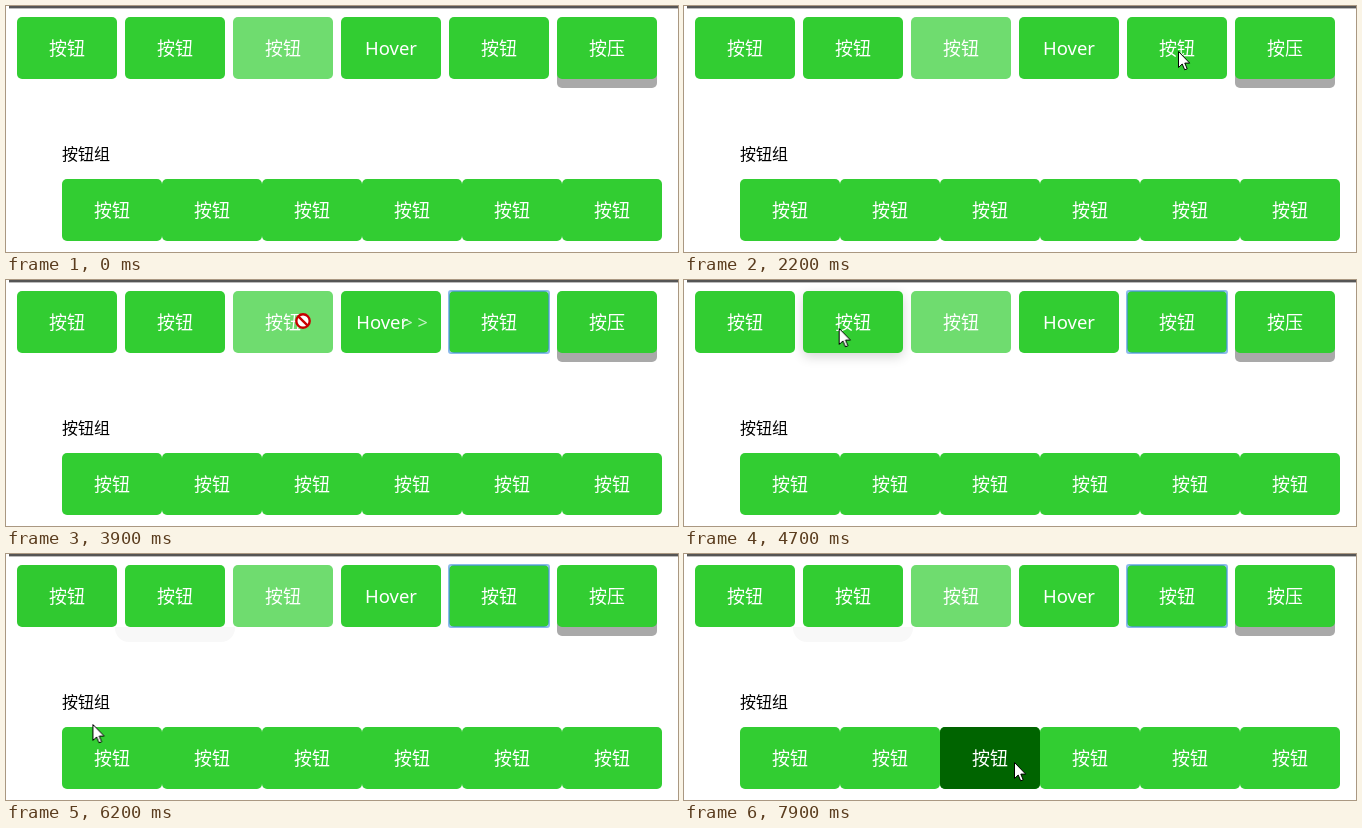
Animation of 672 by 246 pixels, one loop 8 s. Source, as an HTML page:

```html
<!DOCTYPE html>
<html lang="zh-CN">
<head>
<meta charset="utf-8">
<title>按钮</title>
<style>
/* --p: progress of an element's own effect, 0 to 1 */
@property --p { syntax: "<number>"; inherits: true; initial-value: 0; }

html, body { margin: 0; width: 100%; height: 100%; overflow: hidden; background: #fff; }
.stage {
  position: relative; width: 672px; height: 246px; overflow: hidden;
  font: 18px/62px "Open Sans", "Noto Sans CJK SC", "Noto Sans CJK", sans-serif;
}
.stage * { box-sizing: border-box; animation: 8s step-end -8ms infinite; }
.bar { position: absolute; left: 3px; right: 0; top: 0; height: 3px; background: #555; border-bottom: 1px solid #bbb; }
.label { position: absolute; left: 56px; top: 136px; font-size: 16px; line-height: 24px; color: #000; }
.halo { position: absolute; left: 109px; top: 73px; width: 120px; height: 15px; border-radius: 0 0 14px 14px; background: #f8f8f8; animation-name: halo; }

.row { position: absolute; display: flex; }
.top { left: 11px; top: 11px; gap: 8px; }
.group { left: 56px; top: 173px; }
.btn {
  position: relative; isolation: isolate; flex: none; width: 100px; height: 62px;
  border-radius: 5px; background: #32cd32; color: #fff; text-align: center; white-space: pre;
}
.dark::before {
  content: ""; position: absolute; inset: 0; z-index: -1;
  border-radius: inherit; background: #006400; opacity: var(--p);
}
.first { animation-name: first; }
.lift { box-shadow: 0 4px 12px rgba(0, 0, 0, calc(var(--p) * .2)); animation-name: lift; }
.off { opacity: .7; }
.more { font-family: "Noto Sans", "Open Sans", sans-serif; font-size: 18.5px; animation-name: more; }
.more span { display: block; transform: translateX(calc(var(--p) * -12.5px)); }
.more::after {
  content: "> >"; position: absolute; top: 0; right: calc(8px + var(--p) * 7.5px);
  font-size: 18px; opacity: var(--p);
}
.clip { position: absolute; inset: 0; overflow: hidden; border-radius: inherit; }
.wave {
  position: absolute; background: #f1f1f1; opacity: calc(1 - var(--p));
  left: calc(32px - var(--p) * 20px); top: calc(46px - var(--p) * 120px);
  width: calc(var(--p) * 350px); height: calc(var(--p) * 300px);
}
.stage .wave { animation-name: wave; }
.ring { position: absolute; inset: -1px; border: 2px solid rgba(77, 150, 224, .65); border-radius: 3px; }
.stage .ring5 { animation-name: ring5; }
.stage .ring6 { animation-name: ring6; }
.stage .press { box-shadow: 0 9px #a9a9a9; animation-name: shade, press; }
.stage .g1 { animation-name: g1; }
.stage .g2 { animation-name: g2; }
.stage .g3 { animation-name: g3; }
.stage .first { animation-name: first; }
.stage .lift { animation-name: lift; }
.stage .more { animation-name: more; }
.stage .halo { animation-name: halo; }

.cursor { position: absolute; left: 0; top: 0; width: 0; height: 0; }
.cursor svg { position: absolute; left: 0; top: 0; overflow: visible; }
.stage .cursor { animation-name: move; animation-timing-function: linear; }
.stage .arrow { animation-name: arrow; }
.stage .ban { animation-name: ban; }

/* 1.25% is 100 ms */
@keyframes shade {
  0% { --p: 0; } 3.75% { --p: .41; } 5% { --p: .8; } 6.25% { --p: .96; } 7.5% { --p: 1; }
  17.5% { --p: .59; } 18.75% { --p: .2; } 20% { --p: .04; } 21.25%, 100% { --p: 0; }
}
@keyframes press {
  0% { transform: none; box-shadow: 0 9px #a9a9a9; }
  12.5% { transform: translateY(2px); box-shadow: 0 7px #898989; }
  13.75% { transform: translateY(1px); box-shadow: 0 8px #999; }
  15%, 100% { transform: none; box-shadow: 0 9px #a9a9a9; }
}
@keyframes ring6 { 0% { opacity: 0; } 12.5% { opacity: 1; } 27.5%, 100% { opacity: 0; } }
@keyframes ring5 { 0% { opacity: 0; } 28.75%, 100% { opacity: 1; } }
@keyframes wave {
  0% { --p: 1; } 27.5% { --p: 0; } 28.75% { --p: .14; } 30% { --p: .41; } 31.25% { --p: .64; }
  32.5% { --p: .8; } 33.75% { --p: .9; } 35% { --p: .96; } 36.25% { --p: .99; } 37.5%, 100% { --p: 1; }
}
@keyframes more {
  0% { --p: 0; } 38.75% { --p: .295; } 40% { --p: .683; } 41.25% { --p: .885; } 42.5% { --p: .976; } 43.75% { --p: 1; }
  48.75% { --p: .705; } 50% { --p: .317; } 51.25% { --p: .115; } 52.5% { --p: .024; } 53.75%, 100% { --p: 0; }
}
@keyframes lift {
  0% { --p: 0; } 57.5% { --p: .41; } 58.75% { --p: .8; } 60% { --p: 1; }
  65% { --p: .59; } 66.25% { --p: .2; } 67.5%, 100% { --p: 0; }
}
@keyframes halo { 0% { opacity: 0; } 60%, 100% { opacity: 1; } }
@keyframes first {
  0% { --p: 0; } 66.25% { --p: .1; } 67.5% { --p: .4; } 68.75% { --p: .76; } 70% { --p: 1; }
  75% { --p: .59; } 76.25% { --p: .2; } 77.5% { --p: .04; } 78.75%, 100% { --p: 0; }
}
@keyframes g1 { 0% { --p: 0; } 78.75% { --p: 1; } 80% { --p: 0; } 83.75% { --p: 1; } 86.25%, 100% { --p: 0; } }
@keyframes g2 { 0% { --p: 0; } 86.25% { --p: 1; } 92.5%, 100% { --p: 0; } }
@keyframes g3 { 0% { --p: 0; } 92.5%, 100% { --p: 1; } }
@keyframes arrow { 0% { opacity: 1; } 48.75% { opacity: 0; } 55%, 100% { opacity: 1; } }
@keyframes ban { 0% { opacity: 0; } 48.75% { opacity: 1; } 55%, 100% { opacity: 0; } }
@keyframes move {
  0% { transform: translate(700px, 50px); animation-timing-function: step-end; }
  3.75% { transform: translate(663px, 50px); animation-timing-function: steps(4, start); }
  8.75% { transform: translate(608px, 50px); }
  17.5% { transform: translate(608px, 50px); animation-timing-function: steps(4, start); }
  22.5% { transform: translate(510px, 45px); }
  23.75% { transform: translate(510px, 45px); animation-timing-function: steps(2, start); }
  26.25% { transform: translate(494px, 45px); }
  33.75% { transform: translate(494px, 45px); animation-timing-function: steps(4, start); }
  38.75% { transform: translate(431px, 43px); animation-timing-function: steps(5, start); }
  45% { transform: translate(390px, 43px); }
  46.25% { transform: translate(390px, 43px); animation-timing-function: steps(3, start); }
  50% { transform: translate(297px, 41px); animation-timing-function: steps(6, start); }
  57.5% { transform: translate(212px, 44px); animation-timing-function: steps(3, start); }
  61.25% { transform: translate(126px, 50px); }
  65% { transform: translate(126px, 50px); animation-timing-function: steps(4, start); }
  70% { transform: translate(81px, 50px); }
  75% { transform: translate(81px, 50px); animation-timing-function: steps(5, start); }
  81.25% { transform: translate(90px, 250px); }
  82.5% { transform: translate(80px, 248px); animation-timing-function: steps(4, start); }
  87.5% { transform: translate(176px, 211px); animation-timing-function: steps(5, start); }
  93.75% { transform: translate(265px, 211px); animation-timing-function: steps(5, start); }
  100% { transform: translate(330px, 208px); }
}
</style>
</head>
<body>
<div class="stage">
  <div class="bar"></div>
  <div class="halo"></div>
  <div class="row top">
    <div class="btn dark first">按钮</div>
    <div class="btn lift">按钮</div>
    <div class="btn off">按钮</div>
    <div class="btn more"><span>Hover</span></div>
    <div class="btn">按钮<i class="clip"><i class="wave"></i></i><i class="ring ring5"></i></div>
    <div class="btn dark press">按压<i class="ring ring6"></i></div>
  </div>
  <div class="label">按钮组</div>
  <div class="row group">
    <div class="btn dark g1">按钮</div>
    <div class="btn dark g2">按钮</div>
    <div class="btn dark g3">按钮</div>
    <div class="btn">按钮</div>
    <div class="btn">按钮</div>
    <div class="btn">按钮</div>
  </div>
  <div class="cursor">
    <svg class="arrow" width="12" height="20">
      <path d="M.5 .5V16.5L4.2 13 6.7 18.8 9.2 17.8 6.8 12.1H11.7Z" fill="#fff" stroke="#000"/>
    </svg>
    <svg class="ban" width="1" height="1">
      <circle r="6.7" fill="#fff" stroke="#c80000" stroke-width="2.4"/>
      <path d="M-4.7 -4.7L4.7 4.7" stroke="#c80000" stroke-width="2.4"/>
    </svg>
  </div>
</div>
</body>
</html>
```
